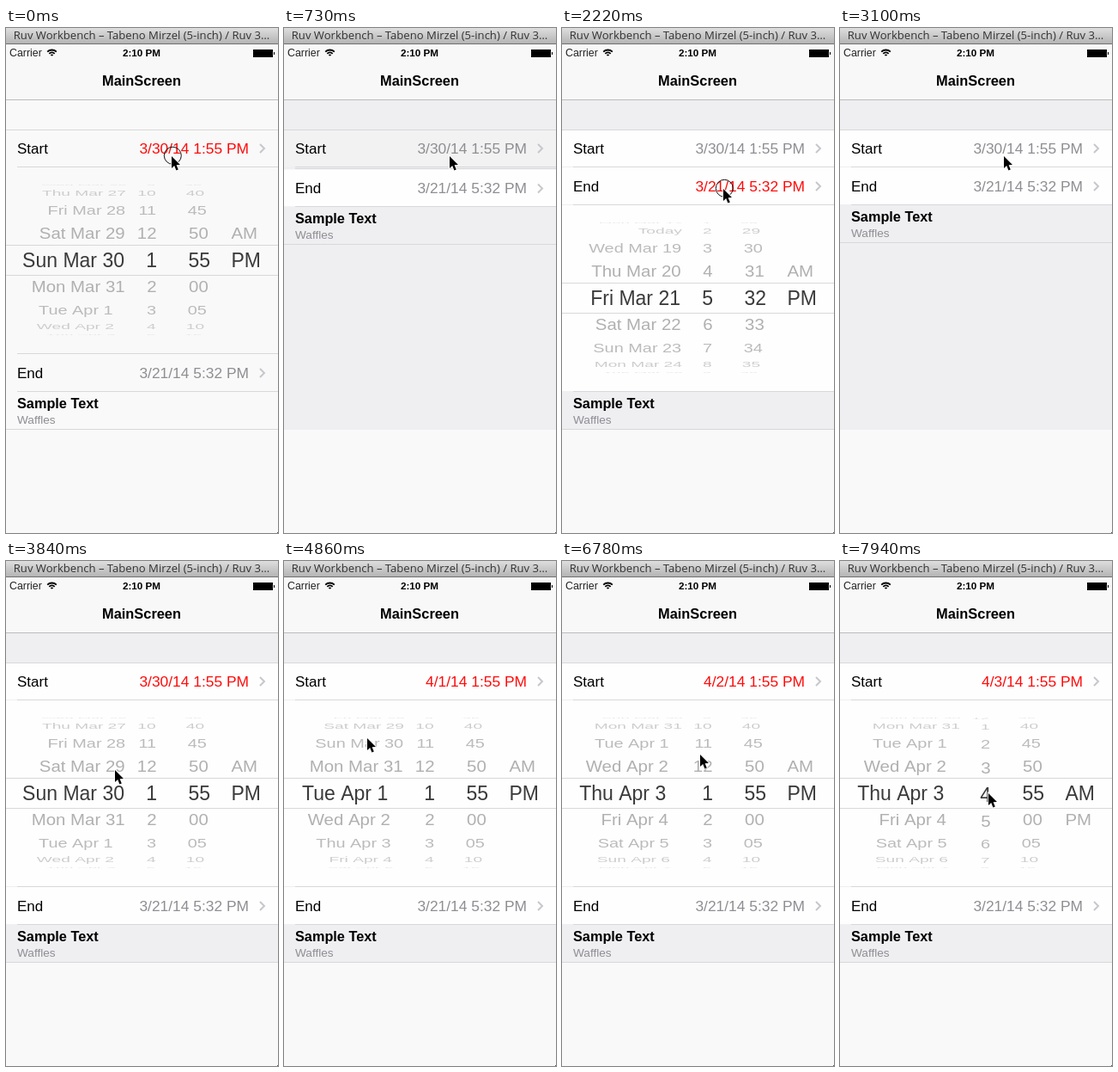
Animation, 317 px wide and 587 px high, one loop 8 s. Source, as an HTML page with a canvas:

```html
<!DOCTYPE html>
<html lang="en">
<head>
<meta charset="utf-8">
<title>Date pickers</title>
<style>
html, body { margin: 0; width: 100%; height: 100%; overflow: hidden; background: #f9f9f9; }
canvas { display: block; }
</style>
</head>
<body>
<canvas id="stage" width="317" height="587"></canvas>
<script>
const ctx = document.getElementById('stage').getContext('2d');
const W = 317, LOOP = 8000, STEP = 147.04;
const SANS = '"Liberation Sans", Arial, sans-serif';
const GRAY = '#8e8e93', RED = '#ff0a0a', LINE = '#d8d8db';
const RADIUS = 87.7, ROW_ANGLE = 20.7 * Math.PI / 180, PICKER_H = 217, ROW_H = 44;
const MIDDLE = 160, COLUMN_RIGHT = [138, 176, 238, 297];
const DAYS = 'Sun Mon Tue Wed Thu Fri Sat'.split(' ');
const MONTHS = 'Jan Feb Mar Apr'.split(' ');

const TAPS = [0, 9, 15, 22];
const DAY_FLICKS = [
  { start: 28, end: 31, rows: 2 },
  { start: 36, end: 39, rows: 1 },
  { start: 42, end: 45, rows: 1 }
];
const HOUR_FLICK = { start: 48, end: 54, rows: -9.06 };
const POINTER_STOPS = [
  [9, 188, 186], [21, 191, 148], [26, 127, 242], [28, 96, 265], [31, 97, 205], [36, 97, 228],
  [39, 97, 184], [42, 97, 232], [46, 161, 224], [51, 172, 354], [54, 173, 269]
];

function glide(k, from, to) {
  const u = Math.min(1, Math.max(0, (k - from) / (to - from)));
  return u * u * (3 - 2 * u);
}
const opening = (k, at) => glide(k, at, at + 3);
const closing = (k, at) => glide(k, at, at + 3.2);
const glow = (k, at) => k < at ? 0 : Math.max(0, 1 - (k - at) / 3);
const scrolled = (k, flick) => flick.rows * glide(k, flick.start, flick.end);
const sum = (list, f) => list.reduce((total, item) => total + f(item), 0);

function rect(x, y, w, h, color) {
  ctx.fillStyle = color;
  ctx.fillRect(x, y, w, h);
}
const rule = (x, y) => rect(x, Math.round(y), W - x, 1, LINE);

function text(str, x, y, size, color, align = 'left', weight = '', family = SANS) {
  ctx.font = `${weight} ${size}px ${family}`;
  ctx.textAlign = align;
  ctx.fillStyle = color;
  ctx.fillText(str, x, y);
}

function path(points, close) {
  ctx.beginPath();
  points.forEach(([x, y]) => ctx.lineTo(x, y));
  if (close) ctx.closePath();
}

function stroke(color, width) {
  ctx.strokeStyle = color;
  ctx.lineWidth = width;
  ctx.stroke();
}

const marchDate = day => new Date(Date.UTC(2014, 2, day));

function dayName(day) {
  if (day === 18) return 'Today';
  const d = marchDate(day);
  return `${DAYS[d.getUTCDay()]} ${MONTHS[d.getUTCMonth()]} ${d.getUTCDate()}`;
}

function columns(day, hour, minute, minuteStep, scroll) {
  const mod = (n, m) => (n % m + m) % m;
  return [
    [scroll.day, n => dayName(day + n)],
    [scroll.hour, n => String(mod(hour + n - 1, 12) + 1)],
    [0, n => String(mod(minute + n * minuteStep, 60)).padStart(2, '0')],
    [scroll.half, n => ['AM', 'PM'][n] || '']
  ];
}

// Single-digit days end earlier than two-digit ones.
const dayInset = (str, size) => / \d$/.test(str) ? .73 * size : 0;

function wheelRow(str, right, angle, cy) {
  const size = 20.6, c = Math.cos(angle);
  if (c < .06) return;
  const depth = 1 / (1 + .14 * (1 - c)), shade = Math.round(172 + 62 * (1 - c));
  ctx.save();
  ctx.translate(MIDDLE, cy - .6 + RADIUS * Math.sin(angle));
  ctx.scale(depth, depth * c);
  text(str, (right - MIDDLE) * .98 - dayInset(str, size), .36 * size, size,
    `rgb(${shade},${shade},${shade})`, 'right');
  ctx.restore();
}

function clipped(areas, draw) {
  ctx.save();
  ctx.beginPath();
  areas.forEach(([y, h]) => ctx.rect(0, y, W, h));
  ctx.clip();
  draw();
  ctx.restore();
}

function eachRow(cols, reach, draw) {
  cols.forEach(([pos, label], col) => {
    const mid = Math.round(pos);
    for (let n = mid - reach; n <= mid + reach; n++) draw(label(n), COLUMN_RIGHT[col], n - pos);
  });
}

function picker(top, open, cols, paper) {
  if (!open) return;
  const cy = top + 109, lens = cy - 18;
  ctx.save();
  ctx.globalAlpha = open;
  rect(0, top + 1, W, PICKER_H - 1, paper);
  clipped([[cy - 88, 70], [cy + 18, 70]], () => eachRow(cols, 4, (str, right, offset) =>
    wheelRow(str, right, offset * ROW_ANGLE, cy)));
  clipped([[lens + 1, 34]], () => eachRow(cols, 1, (str, right, offset) =>
    text(str, right - dayInset(str, 23), cy + 8 + offset * 32, 23, '#3a3a3a', 'right')));
  rule(0, lens);
  rule(0, lens + 35);
  ctx.restore();
}

function cell(top, title, detail, color, light, paper) {
  const tone = Math.round(254 - 37 * light), y = top + 23;
  rect(0, top + 1, W, ROW_H - 1, light ? `rgb(${tone},${tone},${tone})` : paper);
  text(title, 13, y + 6, 17, '#000');
  text(detail, 283, y + 6, 17.4, color, 'right');
  path([[296, y - 5], [301, y], [296, y + 5]]);
  stroke('#c7c7cc', 2);
}

function chrome() {
  rect(0, 0, W, 84, '#f8f8f8');
  const bar = ctx.createLinearGradient(0, 0, 0, 18);
  bar.addColorStop(0, '#dedede');
  bar.addColorStop(1, '#b4b4b4');
  rect(0, 0, W, 18, bar);
  rect(0, 18, W, 1, '#707070');
  text('Ruv Workbench – Tabeno Mirzel (5-inch) / Ruv 3…', 158, 13, 13.1, '#333', 'center', '',
    '"Open Sans", "Noto Sans", sans-serif');
  text('Carrier', 4, 33, 12.4, '#222');
  text('2:10 PM', 158, 33, 11.7, '#000', 'center', 'bold');
  for (let r = 1.5; r < 9; r += 3) {
    ctx.beginPath();
    ctx.arc(53.5, 33, r, -Math.PI * .75, -Math.PI * .25);
    stroke('#000', 1.8);
  }
  rect(288, 25, 23, 9, '#000');
  rect(312, 28, 1, 3, '#000');
  text('MainScreen', 158, 67, 16.4, '#000', 'center', 'bold');
  rect(0, 83, W, 1, '#bcbcbe');
}

function drawPointer(k) {
  let x = 193, y = 148;
  for (const [at, stopX, stopY] of POINTER_STOPS) {
    const u = glide(k, at - 2, at);
    x += (stopX - x) * u;
    y += (stopY - y) * u;
  }
  const dragging = [...DAY_FLICKS, HOUR_FLICK].some(f => k > f.start && k < f.start + 3);
  if (dragging || TAPS.includes(k)) {
    ctx.beginPath();
    ctx.arc(x + 1.3, y + .3, 10, 0, Math.PI * 2);
    stroke('#111', 1);
  }
  ctx.save();
  ctx.translate(x, y + 1);
  path([[0, 0], [0, 14], [3.2, 11], [5.4, 16.4], [7.8, 15.4], [5.6, 10.2], [10, 10]], true);
  stroke('#fff', 1.6);
  ctx.fillStyle = '#000';
  ctx.fill();
  ctx.restore();
}

// The row's label follows the wheel two steps after it settles.
function startLabel(k) {
  const settled = DAY_FLICKS.filter(f => k >= f.end + 2);
  const d = marchDate(30 + sum(settled, f => f.rows));
  return `${d.getUTCMonth() + 1}/${d.getUTCDate()}/14 1:55 PM`;
}

function draw(k) {
  const flat = k < 3, ground = flat ? '#f9f9f9' : '#efeff2', paper = flat ? '#f9f9f9' : '#fefefe';
  const s = 1 - closing(k, 2) + opening(k, 22), e = opening(k, 9) - closing(k, 16);
  const startTop = 118, startBottom = 161, endTop = startBottom + PICKER_H * s;
  const endBottom = endTop + ROW_H, sampleTop = endBottom + PICKER_H * e;
  const below = y => rect(0, y, W, Math.max(0, 467 - y), ground);
  const startScroll = {
    day: sum(DAY_FLICKS, f => scrolled(k, f)),
    hour: scrolled(k, HOUR_FLICK),
    half: 1 - glide(k, 49, 51)
  };

  rect(0, 0, W, 587, '#f9f9f9');
  rect(0, 84, W, 383, ground);
  chrome();
  cell(startTop - 1, 'Start', startLabel(k), k < 3 || k > 22 ? RED : GRAY,
    glow(k, 3) || glow(k, 23), paper);
  rule(0, startTop);
  picker(startBottom, s, columns(30, 1, 55, 5, startScroll), paper);
  rule(13, startBottom);

  below(endTop);
  cell(endTop, 'End', '3/21/14 5:32 PM', k > 9 && k < 17 ? RED : GRAY,
    glow(k, 10) || glow(k, 17), paper);
  rule(13, endTop);
  picker(endBottom, e, columns(21, 5, 32, 1, { day: 0, hour: 0, half: 1 }), paper);
  rule(13, endBottom);

  below(sampleTop);
  rule(13, sampleTop);
  text('Sample Text', 13, sampleTop + 20, 16.3, '#000', 'left', 'bold');
  text('Waffles', 13, sampleTop + 38, 13.6, GRAY);
  rule(0, sampleTop + ROW_H);
  rect(316, 586, 1, 1, '#555');
  drawPointer(k);
}

function tick() {
  draw(Math.floor((performance.now() % LOOP + 8) / STEP));
  requestAnimationFrame(tick);
}
tick();
</script>
</body>
</html>
```
